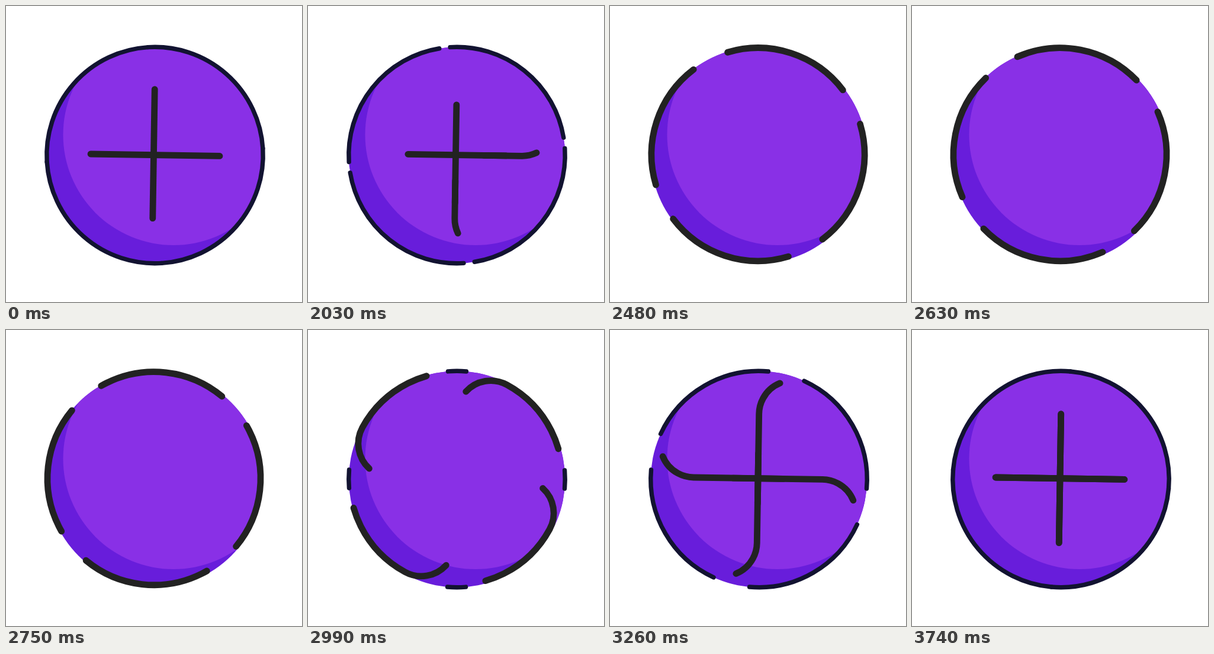
An HTML page with a canvas for the animation above (3.89 s loop, 500 by 500 pixels).

```html
<!DOCTYPE html>
<html lang="en">
<head>
<meta charset="utf-8">
<title>Plus button</title>
<style>
  html, body { margin: 0; width: 100%; height: 100%; overflow: hidden; background: #fff; }
  canvas { display: block; width: 100vmin; height: 100vmin; }
</style>
</head>
<body>
<canvas id="stage" width="500" height="500"></canvas>
<script>
const ctx = document.getElementById('stage').getContext('2d');
const LOOP = 3890, START = 2000, END = 3740, STEP = 30;
const RAD = Math.PI / 180;

const DISC = { x: 251.5, y: 252, r: 182.7 };
const HUB = { x: 250, y: 250.7, tilt: 0.9 * RAD };

// Each bar slides along: line, bend, big arc, bend, line.
const BIG = 180, BEND = 57;
const HALF = Math.sqrt((BIG - BEND) ** 2 - BEND ** 2);
const BAR = 2 * HALF;
const JOIN = Math.atan2(BEND, HALF);
const TURN = BEND * (Math.PI / 2 + JOIN);
const TRAVEL = BAR + 2 * TURN + BIG * (Math.PI - 2 * JOIN);

const track = new Path2D();
track.moveTo(-HALF, 0);
track.lineTo(HALF, 0);
track.arc(HALF, -BEND, BEND, Math.PI / 2, -JOIN, true);
track.arc(0, 0, BIG, -JOIN, JOIN - Math.PI, true);
track.arc(-HALF, -BEND, BEND, JOIN - Math.PI, -1.5 * Math.PI, true);
track.lineTo(HALF, 0);

// time, distance travelled, speed
const KEYS = [
  [2000, 0, 0.88], [2030, 26, 0.86], [2480, 367.7, 0.3], [2750, 409, 0.3],
  [2990, 584, 1], [3260, 777, 0.38], [3740, TRAVEL, 0]
];

function travel(t) {
  if (t <= START) return 0;
  if (t >= END) return TRAVEL;
  const i = KEYS.findIndex(k => k[0] > t);
  const [t0, a, va] = KEYS[i - 1], [t1, b, vb] = KEYS[i];
  const d = t1 - t0, u = (t - t0) / d, w = 1 - u;
  return a * (1 + 2 * u) * w * w + b * (3 - 2 * u) * u * u
    + d * (va * u * w * w - vb * u * u * w);
}

function disc(x, y, r, color) {
  ctx.fillStyle = color;
  ctx.beginPath();
  ctx.arc(x, y, r, 0, 2 * Math.PI);
  ctx.fill();
}

function button() {
  ctx.save();
  ctx.beginPath();
  ctx.arc(DISC.x, DISC.y, DISC.r, 0, 2 * Math.PI);
  ctx.clip();
  disc(DISC.x, DISC.y, DISC.r + 1, '#681ddb');
  disc(283, 217.5, 186.5, '#8930e6');
  ctx.restore();
}

// Four quarter arcs: from and to are degrees counter-clockwise past base.
function rim(base, from, to) {
  if (to - from <= 0) return;
  ctx.strokeStyle = '#121331';
  ctx.lineWidth = 7.4;
  for (let k = 0; k < 4; k++) {
    const a = base + 90 * k;
    ctx.beginPath();
    ctx.arc(DISC.x, DISC.y, DISC.r, (a - from) * RAD, (a - to) * RAD, true);
    ctx.stroke();
  }
}

function bars(q) {
  const drift = Math.max(0, 1 - q / (BAR + TURN));
  ctx.strokeStyle = '#222';
  ctx.lineWidth = 10.8;
  for (let k = 0; k < 4; k++) {
    // The second pair grows out from beneath the first.
    const len = k < 2 ? BAR : BAR * Math.min(1, q / 150);
    if (!len) continue;
    const [dx, dy] = k % 2 ? [-0.5, -1] : [2, 1];
    ctx.save();
    ctx.translate(HUB.x + dx * drift, HUB.y + dy * drift);
    ctx.rotate(HUB.tilt + k * Math.PI / 2);
    ctx.setLineDash([len, 3000]);
    ctx.lineDashOffset = -q;
    ctx.stroke(track);
    ctx.restore();
  }
}

function draw(t) {
  const q = travel(START + Math.floor((Math.min(t, END) - START) / STEP) * STEP);
  const perDegree = DISC.r * RAD;
  ctx.fillStyle = '#fff';
  ctx.fillRect(0, 0, 500, 500);
  ctx.lineCap = 'round';
  button();
  rim(-3.6, Math.max(0, (q - 7.6) / perDegree), 90);
  rim(5, 0, Math.min(90, (q - 553) / perDegree));
  bars(q);
}

const t0 = performance.now();
function tick() {
  draw((performance.now() - t0) % LOOP);
  requestAnimationFrame(tick);
}
tick();
</script>
</body>
</html>
```
